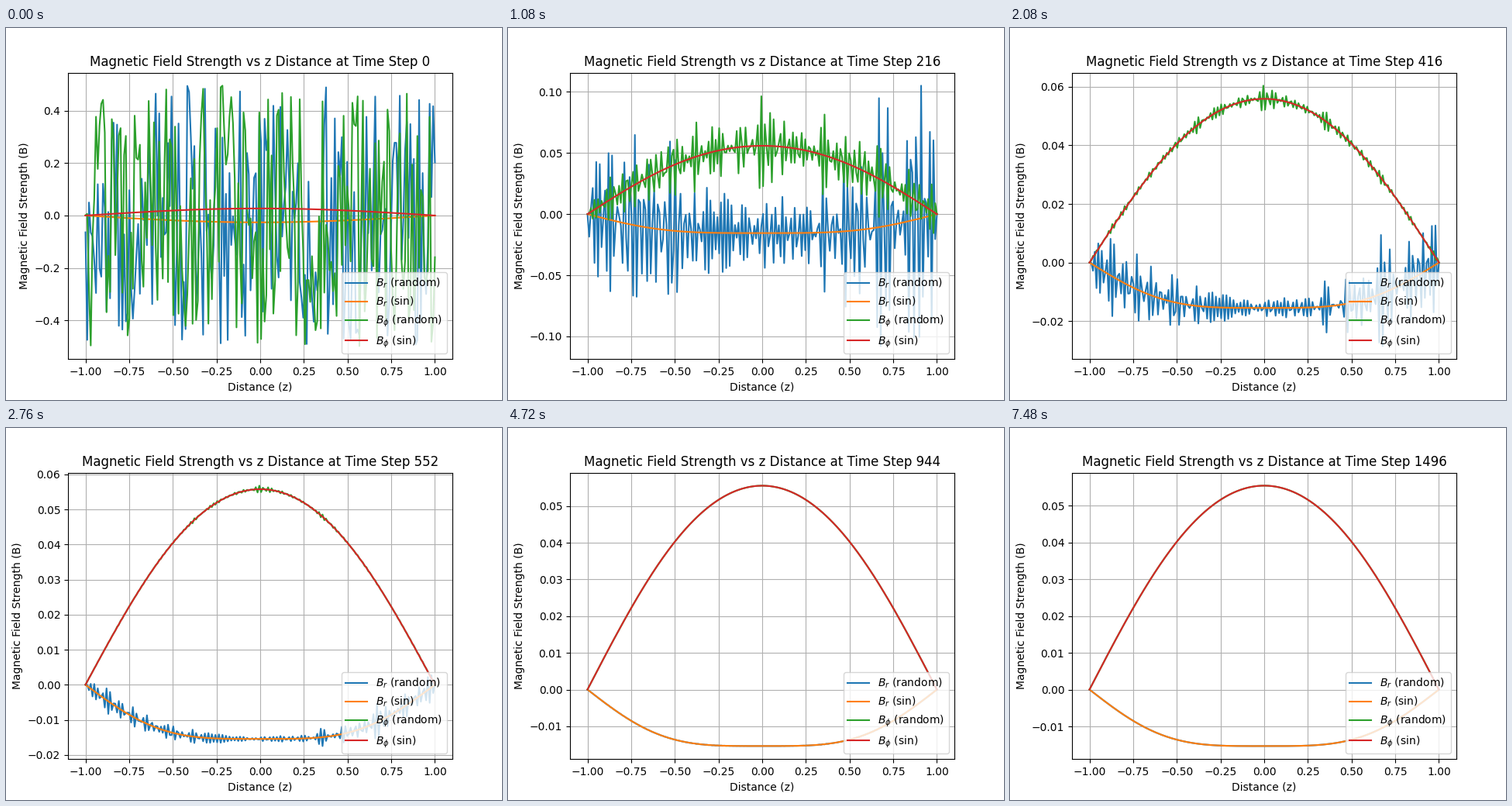
Recreate the animation shown at these times as a matplotlib script. Size 640x480 px, loop 7520 ms.

```python
import numpy as np
import matplotlib.pyplot as plt
from matplotlib.animation import FuncAnimation

N = 200            # grid points
FRAMES = 188
STRIDE = 8         # time steps per drawn picture
D = 0.01           # diffusivity times time step
ALPHA = 3.15 * D   # alpha effect per step
SHEAR = 8.0 * D    # omega effect per step
CROSS = 1.0        # grid-scale leak from B_phi into B_r

z = np.linspace(-1, 1, N)
dz = z[1] - z[0]


def operators():
    """Second difference, diffusion step and source solver (fixed ends)."""
    lap = np.eye(N, k=1) - 2 * np.eye(N) + np.eye(N, k=-1)
    lap[[0, -1]] = 0
    half = 0.5 * D / dz**2 * lap
    solve = np.linalg.inv(np.eye(N) - half)
    return lap, solve @ (np.eye(N) + half), solve


def simulate():
    """Return B_r (random), B_r (sin), B_phi (random), B_phi (sin) over time."""
    np.random.seed(2)
    rand_r = np.random.rand(N) - 0.5
    rand_phi = np.random.rand(N) - 0.5
    hump = np.sin(np.pi * (z + 1) / 2)
    sin_r, sin_phi = -0.026 * hump, 0.027 * hump
    lap, spread, solve = operators()

    # columns: smooth r, smooth phi, rough r, rough phi
    b = np.column_stack([sin_r, sin_phi, rand_r - sin_r, rand_phi - sin_phi])
    shots = []
    for n in range((FRAMES - 1) * STRIDE + 1):
        r, phi, dr, dphi = b.T
        if n % STRIDE == 0:
            shots.append((r + dr, r.copy(), phi + dphi, phi.copy()))
        b[[0, -1]] = 0
        b_eq = 0.0553 + 0.001 * np.exp(-n / 800)
        sat = (phi / b_eq) ** 2
        src = np.column_stack([
            -ALPHA * phi * (1 - sat),
            -SHEAR * r,
            -ALPHA * dphi * (1 - 3 * sat) - CROSS * (1 - sat) * (lap @ dphi),
            -SHEAR * dr,
        ])
        src[[0, -1]] = 0
        b = spread @ b + solve @ src
    return shots


shots = simulate()

fig, ax = plt.subplots(figsize=(6.4, 4.8), dpi=100)
labels = [r"$B_r$ (random)", r"$B_r$ (sin)",
          r"$B_\phi$ (random)", r"$B_\phi$ (sin)"]
lines = [ax.plot(z, y, label=s)[0] for y, s in zip(shots[0], labels)]
ax.set_xlabel("Distance (z)")
ax.set_ylabel("Magnetic Field Strength (B)")
ax.grid(True)
ax.legend(loc="lower right")


def update(i):
    for line, y in zip(lines, shots[i]):
        line.set_ydata(y)
    ax.relim()
    ax.autoscale_view()
    ax.set_title("Magnetic Field Strength vs z Distance "
                 f"at Time Step {i * STRIDE}")
    return lines


anim = FuncAnimation(fig, update, frames=FRAMES, interval=40,
                     repeat=True, repeat_delay=0, blit=False)
plt.show()
```
